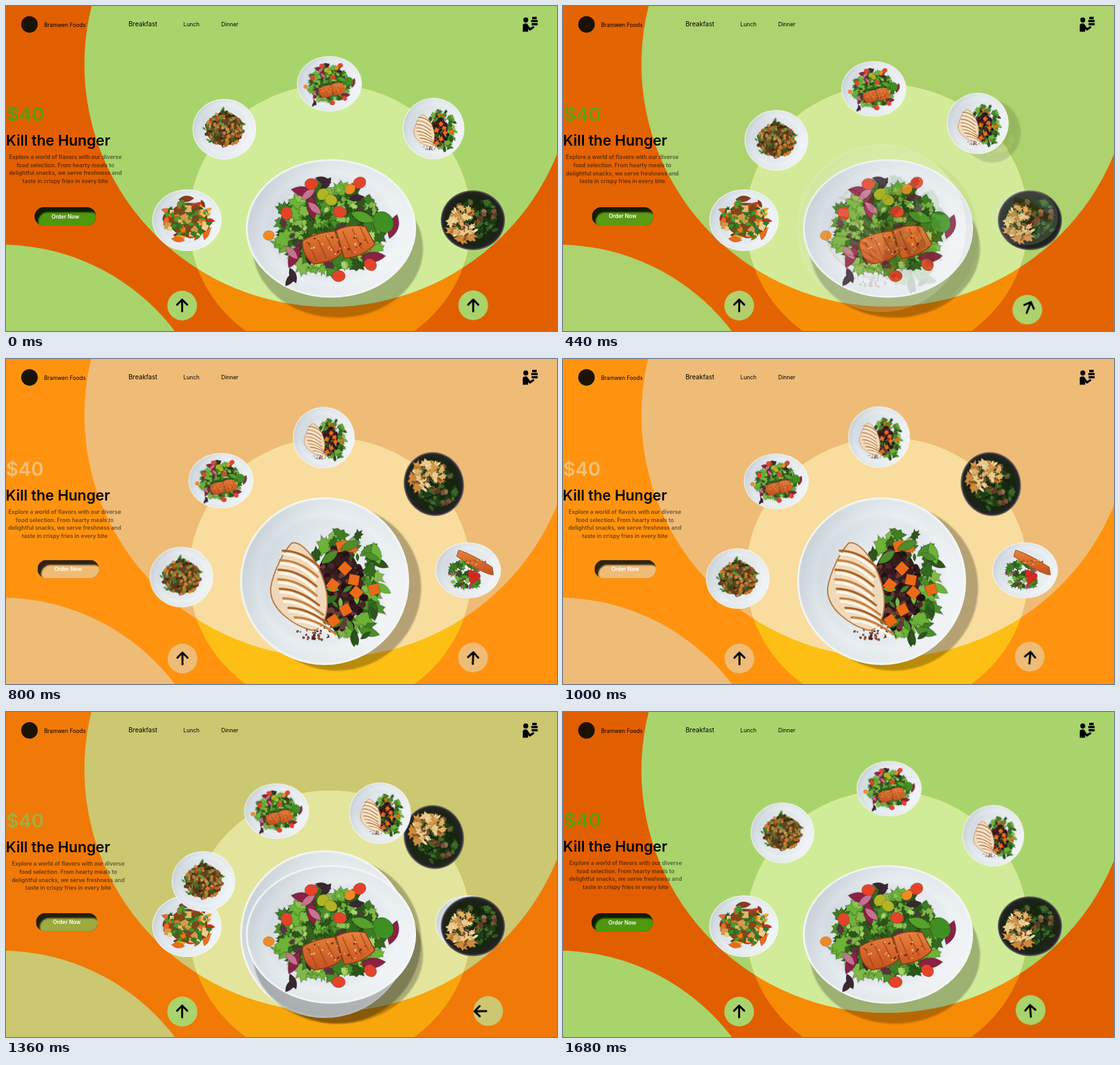
These frames come from a looping animation (868 by 512 pixels, 1.72 s). An HTML page:

```html
<!DOCTYPE html>
<html lang="en">
<head>
<meta charset="utf-8">
<title>Menu carousel</title>
<style>
html, body { margin: 0; width: 100%; height: 100%; overflow: hidden; background: #e25f01; }
svg { display: block; width: 868px; height: 512px; font-family: Inter, "Open Sans", sans-serif; }
.move, .tint, .flip, .low, .mid, .top, .nudge { animation: 1720ms linear infinite; }
.move { animation-name: move; }
.tint { animation-name: tint; animation-timing-function: cubic-bezier(.4, 0, .6, 1); }
.flip { animation-name: flip; animation-timing-function: step-end; }
.nudge { animation-name: nudge; animation-timing-function: step-end; }
.low { animation-name: low; }
.mid { animation-name: mid; }
.top { animation-name: top; }
.bold { font-weight: 600; }

/* every part goes from --a to --b and back with a pull-back and an overshoot */
@keyframes move {
  0% { transform: translate(var(--a)) rotate(0deg); }
  2.616% { transform: translate(var(--a)) rotate(0deg); animation-timing-function: cubic-bezier(.72, -.36, .45, 1.25); }
  55.233% { transform: translate(var(--b)) rotate(var(--turn, 0deg)); animation-timing-function: cubic-bezier(.7, -.4, .4, 1.4); }
  99.593%, 100% { transform: translate(var(--a)) rotate(0deg); }
}
/* colours keep still while the parts overshoot */
@keyframes tint {
  0%, 21% { fill: var(--a); }
  45.6%, 70% { fill: var(--b); }
  88.1%, 100% { fill: var(--a); }
}
@keyframes flip {
  0% { transform: scaleY(1); }
  33.49% { transform: scaleY(-1); }
  80.5%, 100% { transform: scaleY(1); }
}
@keyframes nudge {
  0% { transform: translateX(0); }
  55.233%, 100% { transform: translateX(5px); }
}
/* the new dishes fade in above, then the old ones fade out below */
@keyframes low {
  0%, 33.49% { opacity: 1; }
  43.02%, 100% { opacity: 0; }
}
@keyframes mid {
  0% { opacity: 0; }
  21.86% { opacity: 0; animation-timing-function: ease-in; }
  33.49%, 79.07% { opacity: 1; }
  87.21%, 100% { opacity: 0; }
}
@keyframes top {
  0% { opacity: 0; }
  69.88% { opacity: 0; animation-timing-function: ease-in; }
  78.8%, 100% { opacity: 1; }
}
</style>
</head>
<body>
<svg viewBox="0 0 868 512">
  <defs>
    <radialGradient id="china">
      <stop offset="0" stop-color="#eef2f5"/>
      <stop offset=".72" stop-color="#e2e8ec"/>
      <stop offset=".8" stop-color="#eaeff2"/>
      <stop offset=".96" stop-color="#e2e8eb"/>
      <stop offset="1" stop-color="#fafbfb"/>
    </radialGradient>
    <linearGradient id="shade" y1=".3" y2=".7">
      <stop offset="0" stop-color="#8fa0ac" stop-opacity=".35"/>
      <stop offset=".45" stop-color="#dfe6ea" stop-opacity=".1"/>
      <stop offset="1" stop-color="#fff" stop-opacity=".6"/>
    </linearGradient>
    <linearGradient id="fillet" x2="0" y2="1">
      <stop offset="0" stop-color="#e8813c"/>
      <stop offset="1" stop-color="#c4501d"/>
    </linearGradient>
    <filter id="soft"><feGaussianBlur stdDeviation="1.2"/></filter>
    <clipPath id="disc"><ellipse class="move" style="--a:0px,1px;--b:0px,-2.500px" cx="509.500" cy="91" rx="386" ry="382"/></clipPath>
    <clipPath id="pill"><rect width="97" height="29" rx="14.5"/></clipPath>

    <g id="salmon"></g>
    <g id="chicken"></g>
    <g id="grain"></g>
    <g id="veg"></g>
    <g id="pan"></g>
    <g id="salad"></g>
    <path id="arrow" d="M0 9.5V-9M-8 -.8L0 -9L8 -.8" fill="none" stroke="#000" stroke-width="3.1" stroke-linecap="round" stroke-linejoin="round"/>

    <g id="setA">
      <use href="#veg" x="285" y="337.5"/>
      <use href="#pan" x="735.5" y="337.5"/>
      <ellipse cx="523" cy="382" rx="134" ry="109" fill-opacity=".25" filter="url(#soft)"/>
      <use href="#salmon" x="512" y="350.5"/>
      <circle cx="277.5" cy="472" r="23.4" fill="#a9d46c"/>
      <use href="#arrow" x="277.5" y="471.5"/>
    </g>
    <g id="setB">
      <use href="#pan" transform="translate(674 197) rotate(72)"/>
      <use href="#salad" x="728" y="333"/>
      <ellipse cx="521" cy="360" rx="133" ry="131" fill-opacity=".27" filter="url(#soft)"/>
      <use href="#chicken" x="502" y="350"/>
      <circle cx="278" cy="472" r="23.4" fill="#eebc76"/>
      <use href="#arrow" x="278" y="471.5"/>
    </g>
  </defs>

  <rect class="tint" style="--a:#e25f01;--b:#ff930f" width="868" height="512"/>
  <g class="tint" style="--a:#a9d46c;--b:#eebc76">
    <ellipse class="move" style="--a:0px,1px;--b:0px,-2.500px" cx="509.500" cy="91" rx="386" ry="382"/>
    <circle cx="-8" cy="719.5" r="343.5"/>
  </g>
  <ellipse class="tint" style="--a:#f68b05;--b:#fdbf13" cx="510.5" cy="339" rx="222.5" ry="215.5"/>
  <g clip-path="url(#disc)">
    <ellipse class="tint" style="--a:#d0ec99;--b:#f8dd9f" cx="510.5" cy="339" rx="222.5" ry="215.5"/>
  </g>

  <circle cx="37" cy="29" r="13" fill="#1b1206"/>
  <text x="60" y="32.6" font-size="8.6">Bramwen Foods</text>
  <text x="193" y="32.3" font-size="10.1">Breakfast</text>
  <text x="279.5" y="32.2" font-size="8.7">Lunch</text>
  <text x="339" y="32.2" font-size="8.7">Dinner</text>
  <g>
    <circle cx="818.8" cy="22" r="3.9"/>
    <path d="M814 40.500V31Q814 27.500 818 27.500H820.500L825.500 34.500L831 31.500L832.500 34L825.500 39L822.500 36.500V40.500Z"/>
    <path d="M829 17h7v4h-7zM827.500 22h10v3.500h-10zM828 27h9.500v3.500h-9.500z"/>
  </g>

  <g class="move" style="--a:1px,181px;--b:0px,184px">
    <text class="tint bold" style="--a:#569c10;--b:#f2c07a" font-size="30">$40</text>
  </g>
  <g class="move" style="--a:0px,220px;--b:-.5px,223px">
    <text class="bold" font-size="23">Kill the Hunger</text>
  </g>
  <g class="move" style="--a:93.5px,241px;--b:92.5px,244px">
    <g class="nudge bold" font-size="8.75" text-anchor="middle" fill-opacity=".55">
      <text>Explore a world of flavors with our diverse</text>
      <text y="12.600">food selection. From hearty meals to</text>
      <text y="25.200">delightful snacks, we serve freshness and</text>
      <text y="37.800">taste in crispy fries in every bite</text>
    </g>
  </g>
  <g class="move" style="--a:45px,317px;--b:49.5px,316.500px">
    <g clip-path="url(#pill)">
      <rect class="tint" style="--a:#101d03;--b:#2e2414" width="97" height="29"/>
      <rect class="tint" style="--a:#4f970c;--b:#efbc76" x="6" y="8" width="97" height="29" rx="14.5" filter="url(#soft)"/>
    </g>
    <text class="bold" x="48.500" y="17.500" font-size="8.4" text-anchor="middle" fill="#fff">Order Now</text>
  </g>

  <g class="low"><use href="#setA"/></g>
  <g class="mid"><use href="#setB"/></g>
  <g class="top"><use href="#setA"/></g>

  <g class="move" style="--a:344px,194px;--b:277.500px,341px"><use href="#grain"/></g>
  <g class="move" style="--a:673.500px,193px;--b:503.500px,125px"><use href="#chicken" transform="scale(.365)"/></g>
  <g class="move" style="--a:509.500px,122.500px;--b:341.500px,190.500px"><use href="#salmon" transform="scale(.381 .4)"/></g>

  <g class="move" style="--a:712.500px,448px;--b:759.500px,448px;--turn:180deg">
    <g class="flip"><circle class="tint" style="--a:#a9d46c;--b:#eebc76" cx="23.500" cy="23.500" r="23.4"/></g>
  </g>
  <g class="move" style="--a:725px,460.500px;--b:747px,460.500px;--turn:180deg">
    <g class="flip"><use href="#arrow" x="11" y="11"/></g>
  </g>
</svg>

<script>
let seed = 41;
const rnd = () => (seed = seed * 16807 % 2147483647) / 2147483647;
const pick = list => list[Math.floor(rnd() * list.length)];
const get = id => document.getElementById(id);

function add(parent, tag, attrs) {
  const node = document.createElementNS('http://www.w3.org/2000/svg', tag);
  for (const key in attrs) node.setAttribute(key, attrs[key]);
  parent.append(node);
  return node;
}

const shapes = {
  leaf: s => `M${-s} 0Q0 ${-s * .8} ${s} 0Q0 ${s * .8} ${-s} 0Z`,
  cube: s => `M${-s} ${-s * .8}L${s * .8} ${-s}L${s} ${s * .8}L${-s * .8} ${s}Z`,
  dot: s => `M${-s} 0a${s} ${s * .85} 0 1 0 ${2 * s} 0a${s} ${s * .85} 0 1 0 ${-2 * s} 0Z`,
  frill: s => {
    let d = '';
    for (let i = 0; i < 17; i++) {
      const a = i / 17 * Math.PI * 2, r = s * (i % 2 ? 1 : .68) * (.75 + .35 * rnd());
      d += `${i ? 'L' : 'M'}${(r * Math.cos(a)).toFixed(1)} ${(r * .65 * Math.sin(a)).toFixed(1)}`;
    }
    return d + 'Z';
  }
};

function bit(g, kind, x, y, size, fill, turn = rnd() * 360) {
  add(g, 'path', {
    d: shapes[kind](size), fill, transform: `translate(${x} ${y}) rotate(${turn})`,
    stroke: '#000', 'stroke-opacity': .16, 'stroke-width': size * .1
  });
}

// scatter n bits over an ellipse
function strew(g, kind, n, [cx, cy, rx, ry], size, fills) {
  for (let i = 0; i < n; i++) {
    const a = rnd() * Math.PI * 2, r = Math.sqrt(rnd());
    bit(g, kind, cx + rx * r * Math.cos(a), cy + ry * r * Math.sin(a), size * (.65 + .7 * rnd()), pick(fills));
  }
}

const bed = (g, [cx, cy, rx, ry], fill) => add(g, 'ellipse', { cx, cy, rx: rx * .95, ry: ry * .95, fill });
const place = (g, kind, size, fill, spots) => spots.forEach(([x, y]) => bit(g, kind, x, y, size, fill));

function plate(id, rx, ry, fill) {
  const g = get(id);
  add(g, 'ellipse', { rx, ry, fill: fill || 'url(#china)' });
  if (!fill) add(g, 'ellipse', { rx: rx * .98, ry: ry * .98, fill: 'url(#shade)' });
  return g;
}

const greens = ['#33691f', '#4c8f2a', '#6cb338', '#3f7d24', '#82b84a', '#2c551c'];
const dark = ['#1f3d18', '#2c5420', '#17290f', '#3d6a2a'];

function salmon() {
  const g = plate('salmon', 134, 109);
  const area = [0, 2, 82, 66];
  bed(g, area, '#35611f');
  strew(g, 'frill', 120, area, 17, greens);
  strew(g, 'frill', 50, area, 9, ['#8cc452', '#a8d46c', '#2c551c', '#5a3440']);
  place(g, 'leaf', 13, '#3b2730', [[-12, -76], [-8, -70], [-64, 80], [-60, 74], [-35, 45], [40, -48]]);
  place(g, 'leaf', 20, '#8c2146', [[-43, -58], [-30, -34], [98, -3], [66, 45], [-58, 44]]);
  place(g, 'leaf', 14, '#c57391', [[-36, -54], [-62, 38], [-26, -32]]);
  bit(g, 'dot', 82, -10, 18, '#3f8f22', 45);
  bit(g, 'leaf', 50, -18, 20, '#54a22c', 20);
  place(g, 'dot', 10.5, '#e4432a', [[-31, -70], [45, -72], [-70, -24], [14, -26], [12, 75], [62, 57]]);
  place(g, 'dot', 9, '#f08a24', [[-98, 11], [30, -62]]);
  place(g, 'dot', 10, '#b3b423', [[-13, -54], [0, -45]]);
  add(g, 'path', { d: 'M-45 20Q-30 8 6 4L17 38Q8 51 -26 56Q-45 46 -45 20Z M8 3Q30 -8 54 -3L69 25Q52 44 21 47Z', fill: 'url(#fillet)', stroke: '#8f3a14', 'stroke-width': 1.5 });
  add(g, 'path', { d: 'M-36 22l14 30M-22 15l15 33M-8 11l15 30M18 4l16 36M33 0l16 33M46 -2l13 27', stroke: '#9c4318', 'stroke-width': 2, 'stroke-opacity': .65, fill: 'none' });
  strew(g, 'dot', 28, [10, 24, 48, 17], 1.6, ['#f4b06c', '#7a3010']);
}

function chicken() {
  const g = plate('chicken', 133, 132);
  strew(g, 'frill', 60, [34, 2, 56, 82], 17, greens);
  strew(g, 'leaf', 22, [44, 10, 52, 84], 14, greens);
  bed(g, [22, 10, 38, 66], '#33201c');
  strew(g, 'dot', 120, [26, 12, 38, 65], 5, ['#341a20', '#4a2529', '#241014', '#6b3a38']);
  strew(g, 'dot', 45, [-16, 82, 28, 12], 1.8, ['#4a2529', '#8d4e3c']);
  strew(g, 'leaf', 16, [36, 0, 50, 72], 10, greens);
  place(g, 'cube', 9, '#ec6a17', [[27, -55], [43, -54], [32, -20], [50, 18], [13, 6], [33, 45], [14, 62], [78, 13], [46, -2]]);
  place(g, 'leaf', 17, '#4f8c2a', [[8, -38], [40, -56]]);
  add(g, 'path', { d: 'M-52 -60C-32 -65 -4 -22 3 18C8 58 -6 80 -22 77C-48 70 -88 44 -85 10C-81 -14 -66 -45 -52 -60Z', fill: '#f0d9bb', stroke: '#b87a42', 'stroke-width': 2 });
  for (let i = 0; i < 8; i++) {
    const y = -44 + i * 15, x = -66 - Math.sin(i / 7 * 3) * 17 + i * 3;
    add(g, 'path', { d: `M${x} ${y - 4}q30 0 ${58 + i} 26`, fill: 'none', stroke: i % 2 ? '#c58243' : '#a9632c', 'stroke-width': 3.5, 'stroke-linecap': 'round' });
    add(g, 'path', { d: `M${x} ${y + 1}q30 0 ${56 + i} 27`, fill: 'none', stroke: '#fff6e8', 'stroke-width': 4 });
  }
}

function grain() {
  const g = plate('grain', 50, 47.5);
  const area = [0, 0, 30, 27];
  strew(g, 'leaf', 24, [0, 0, 34, 31], 4.5, ['#4a8a2e', '#76ad48']);
  bed(g, area, '#5f4422');
  strew(g, 'dot', 150, area, 2.6, ['#8a5a2c', '#b98342', '#5c3a1c', '#c8934f', '#43290f']);
  strew(g, 'cube', 18, area, 2.5, ['#e07a24', '#c95a1c']);
  strew(g, 'leaf', 34, area, 3.5, ['#3f7a28', '#6ba33c', '#2f5a1c']);
}

function veg() {
  const g = plate('veg', 54.5, 48.5);
  strew(g, 'leaf', 40, [2, 0, 38, 34], 9, ['#d9301c', '#ee6a1c', '#f2a81e', '#8a3a20']);
  bed(g, [2, -1, 32, 28], '#7a4a1c');
  strew(g, 'frill', 34, [2, -2, 34, 30], 7, ['#2f7a24', '#4a9a32', '#1f5a1c', '#c8401c', '#e8781e']);
  strew(g, 'cube', 16, [0, 0, 33, 28], 4.8, ['#e6b766', '#d49a48', '#f0cd8a']);
  strew(g, 'frill', 14, [4, 2, 30, 28], 5.5, ['#3f8f2c', '#2f7a24']);
}

function pan() {
  const g = plate('pan', 50.5, 47, '#55524f');
  add(g, 'ellipse', { rx: 48.5, ry: 45, fill: '#232226' });
  add(g, 'ellipse', { rx: 44, ry: 41, fill: '#1a2413' });
  strew(g, 'frill', 75, [6, 0, 35, 35], 7, dark);
  strew(g, 'dot', 14, [4, -8, 32, 26], 4.5, ['#7a5136', '#96704c', '#5c3a26']);
  strew(g, 'frill', 20, [-14, 5, 21, 25], 11, ['#e2b163', '#d8984a', '#edc987', '#cf8a3c']);
  strew(g, 'leaf', 22, [-14, 5, 23, 27], 4, ['#f5dca6', '#b57430', '#8a5224']);
}

function salad() {
  const g = plate('salad', 51.5, 44);
  strew(g, 'frill', 45, [-4, 6, 25, 24], 7, greens);
  strew(g, 'leaf', 16, [-6, 8, 24, 20], 5, ['#8c2146', '#b33a6a', '#4c9428']);
  place(g, 'dot', 6, '#d8281e', [[5, 5], [14, 10], [7, 15]]);
  add(g, 'path', { d: 'M-15 -32Q8 -25 38 -5L40 7Q28 8 -18 -22Z', fill: 'url(#fillet)', stroke: '#96531f' });
  strew(g, 'dot', 14, [10, -13, 18, 4], 1.3, ['#f0b06a', '#a65a22']);
}

[salmon, chicken, grain, veg, pan, salad].forEach(cook => cook());
</script>
</body>
</html>
```
